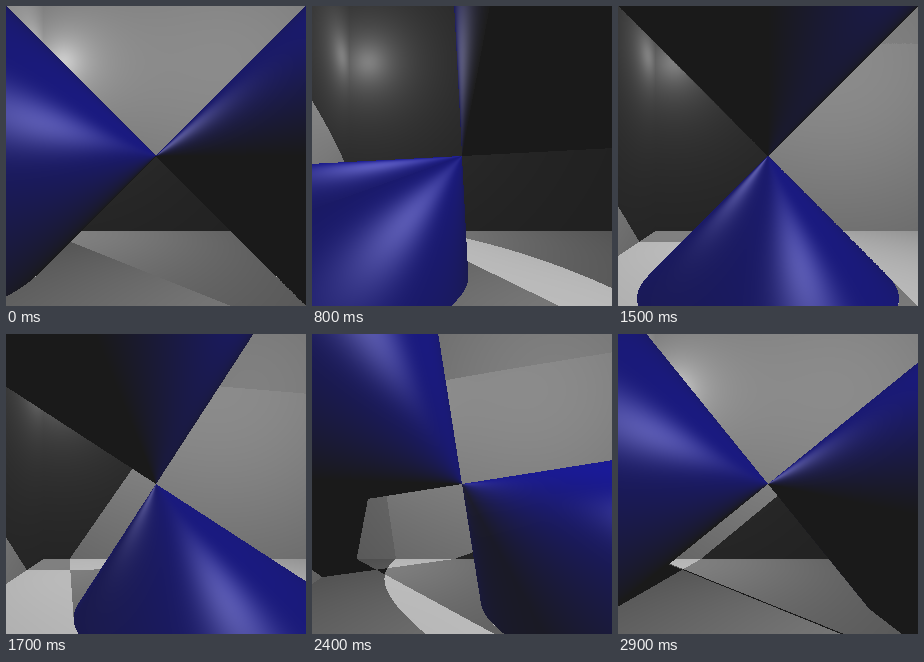
These frames come from a looping animation (300 by 300 pixels, 3000 ms). An HTML page with a canvas:

```html
<!DOCTYPE html>
<html lang="en">
<head>
<meta charset="utf-8">
<title>Rotating double cone</title>
<style>
  html, body { margin: 0; width: 100%; height: 100%; overflow: hidden; background: #1a1a1a; }
  canvas { display: block; width: 300px; height: 300px; }
</style>
</head>
<body>
<canvas id="stage" width="300" height="300"></canvas>
<script>
const SIZE = 300, STEPS = 30, STEP_MS = 100;
const FOCAL = 300, EYE_Z = 5;
const FLOOR = -2, LEFT = -3, BACK = -3;
const AMBIENT = 26, DIFFUSE = 102, SPECULAR = 62, SHININESS = 10;
const LIGHTS = [[-2.5, 2.5, -2.5], [2.5, 2.5, 2.5]];

const ctx = document.getElementById('stage').getContext('2d');
const cache = [];

// Nearer root of a ray against the 45° double cone with axis (ux, uy, 0).
// Rays steeper than the cone (a <= 0) pass through, so they cast no shadow.
function hitCone(ox, oy, oz, dx, dy, dz, ux, uy) {
  const ou = ox * ux + oy * uy, du = dx * ux + dy * uy;
  const a = dx * dx + dy * dy + dz * dz - 2 * du * du;
  if (a <= 0) return Infinity;
  const b = ox * dx + oy * dy + oz * dz - 2 * ou * du;
  const c = ox * ox + oy * oy + oz * oz - 2 * ou * ou;
  const disc = b * b - a * c;
  if (disc < 0) return Infinity;
  const t = (-b - Math.sqrt(disc)) / a;
  return t > 1e-4 ? t : Infinity;
}

function render(step) {
  const angle = step * Math.PI / STEPS;
  const ux = Math.cos(angle), uy = Math.sin(angle);
  const image = ctx.createImageData(SIZE, SIZE);
  let i = 0;

  for (let row = 0; row < SIZE; row++) {
    for (let col = 0; col < SIZE; col++) {
      const dx = (col + 0.5 - SIZE / 2) / FOCAL;
      const dy = (SIZE / 2 - row - 0.5) / FOCAL;

      let t = EYE_Z - BACK, nx = 0, ny = 0, nz = 1;
      if (dy < 0 && FLOOR / dy < t) { t = FLOOR / dy; ny = 1; nz = 0; }
      if (dx < 0 && LEFT / dx < t) { t = LEFT / dx; nx = 1; ny = nz = 0; }
      const tCone = hitCone(0, 0, EYE_Z, dx, dy, -1, ux, uy);
      const onCone = tCone < t;
      if (onCone) t = tCone;

      const px = dx * t, py = dy * t, pz = EYE_Z - t;
      if (onCone) {
        const along = 2 * (px * ux + py * uy);
        nx = px - along * ux; ny = py - along * uy; nz = pz;
        const len = Math.hypot(nx, ny, nz) || 1;
        nx /= len; ny /= len; nz /= len;
      }

      let diffuse = 0, specular = 0;
      for (const [x, y, z] of LIGHTS) {
        const lx = x - px, ly = y - py, lz = z - pz;
        const dist = Math.sqrt(lx * lx + ly * ly + lz * lz);
        const facing = (nx * lx + ny * ly + nz * lz) / dist;
        if (facing <= 0) continue;
        if (!onCone && hitCone(px, py, pz, lx, ly, lz, ux, uy) < 1) continue;
        diffuse += facing;
        if (onCone) {
          const rx = 2 * facing * nx - lx / dist;
          const ry = 2 * facing * ny - ly / dist;
          const rz = 2 * facing * nz - lz / dist;
          const toEye = (-rx * dx - ry * dy + rz) / Math.hypot(dx, dy, 1);
          if (toEye > 0) specular += toEye ** SHININESS;
        }
      }

      const base = AMBIENT + SPECULAR * specular;
      const lit = base + DIFFUSE * diffuse;
      image.data[i++] = onCone ? base : lit;
      image.data[i++] = onCone ? base : lit;
      image.data[i++] = lit;
      image.data[i++] = 255;
    }
  }
  return image;
}

let shown = -1;
function tick() {
  const step = Math.floor(performance.now() / STEP_MS) % STEPS;
  if (step !== shown) {
    cache[step] ||= render(step);
    ctx.putImageData(cache[step], 0, 0);
    shown = step;
  }
  requestAnimationFrame(tick);
}
tick();
</script>
</body>
</html>
```
